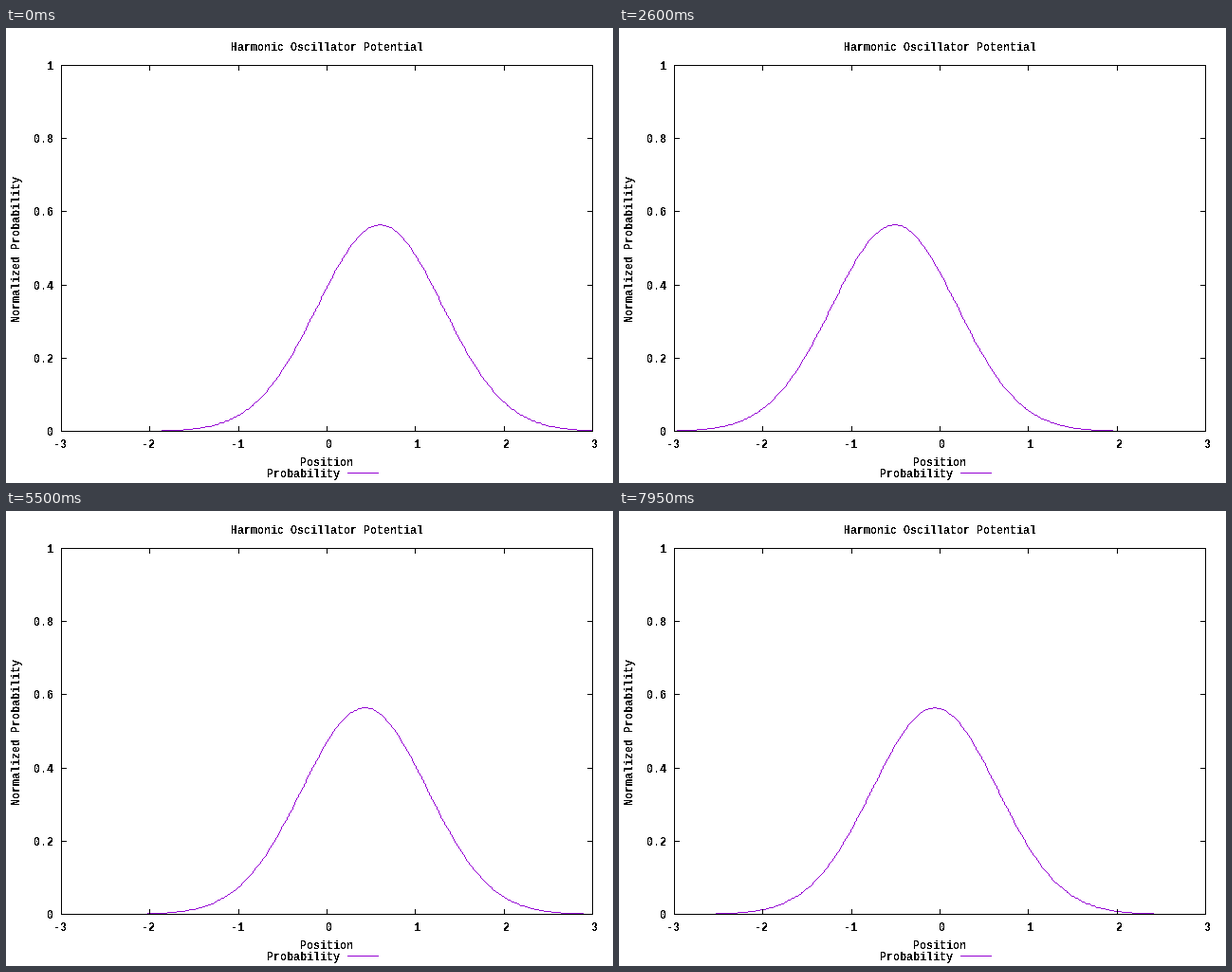
A matplotlib script for the animation above (8 s loop, 640 px wide and 480 px high).

```python
import numpy as np
import matplotlib.pyplot as plt
from matplotlib.animation import FuncAnimation
from matplotlib.colors import to_rgb

W, H = 640, 480
LEFT, RIGHT, TOP, BOTTOM = 58, 618, 39, 425
CELL = 7            # width of one character
TICK = 5
PURPLE = "#9400d3"
STEP = 0.05         # seconds per frame
FRAMES = 160

fig = plt.figure(figsize=(W / 100, H / 100), dpi=100, facecolor="white")
ax = fig.add_axes([0, 0, 1, 1])


def px(x):
    return LEFT + (x + 3) * (RIGHT - LEFT) / 6


def py(y):
    return BOTTOM - y * (BOTTOM - TOP)


def line(xs, ys, color="black"):
    """Draw a crisp one-pixel line through whole pixels."""
    ax.plot(np.array(xs) + 0.5, np.array(ys) + 0.5, color=color, lw=0.72,
            snap=False, zorder=3, solid_capstyle="projecting",
            solid_joinstyle="miter")


def label(x, y, s, **kw):
    ax.text(x, y, s, family="Liberation Mono", weight="bold",
            size=CELL / 0.6 * 0.72, ha="left", va="baseline",
            rotation_mode="anchor", antialiased=False, **kw)


def centred(x, mid, s):
    label(x - len(s) * CELL // 2, mid + 4, s)


def trace(xs, ys):
    """Pixels of a polyline, one per step along the longer axis."""
    xs, ys = np.rint(xs).astype(int), np.rint(ys).astype(int)
    cols, rows = [], []
    for x0, y0, x1, y1 in zip(xs, ys, xs[1:], ys[1:]):
        n = max(abs(x1 - x0), abs(y1 - y0)) + 1
        cols.append(np.linspace(x0, x1, n))
        rows.append(np.linspace(y0, y1, n))
    return (np.rint(np.concatenate(rows)).astype(int),
            np.rint(np.concatenate(cols)).astype(int))


grid = np.linspace(-3, 3, 301)
layer = np.zeros((H, W, 4))
layer[..., :3] = to_rgb(PURPLE)
image = ax.imshow(layer, extent=(0, W, H, 0), interpolation="nearest",
                  aspect="auto", zorder=2)
ax.axis("off")

# frame, ticks and tick labels
line([LEFT, RIGHT, RIGHT, LEFT, LEFT], [TOP, TOP, BOTTOM, BOTTOM, TOP])
for v in range(-3, 4):
    x = round(px(v))
    line([x, x], [BOTTOM, BOTTOM - TICK])
    line([x, x], [TOP, TOP + TICK])
    label(x - 1 - CELL * (v < 0), 443, str(v))
for i in range(6):
    y = round(py(i / 5))
    line([LEFT, LEFT + TICK], [y, y])
    line([RIGHT, RIGHT - TICK], [y, y])
    s = f"{i / 5:g}"
    label(50 - len(s) * CELL, y + 5, s)

# titles and key
centred(338, 20, "Harmonic Oscillator Potential")
centred(338, 458, "Position")
label(275, 474, "Probability")
label(15, 310, "Normalized Probability", rotation=90)
line([360, 392], [469, 469], PURPLE)

ax.set_xlim(0, W)
ax.set_ylim(H, 0)


def draw(n):
    centre = 0.6 * np.cos(n * STEP)
    density = np.exp(-(grid - centre) ** 2) / np.sqrt(np.pi)
    layer[..., 3] = 0
    layer[(*trace(px(grid), py(density)), 3)] = 1
    image.set_data(layer)
    return (image,)


anim = FuncAnimation(fig, draw, frames=FRAMES, interval=50,
                     repeat=True, repeat_delay=0)
plt.show()
```
